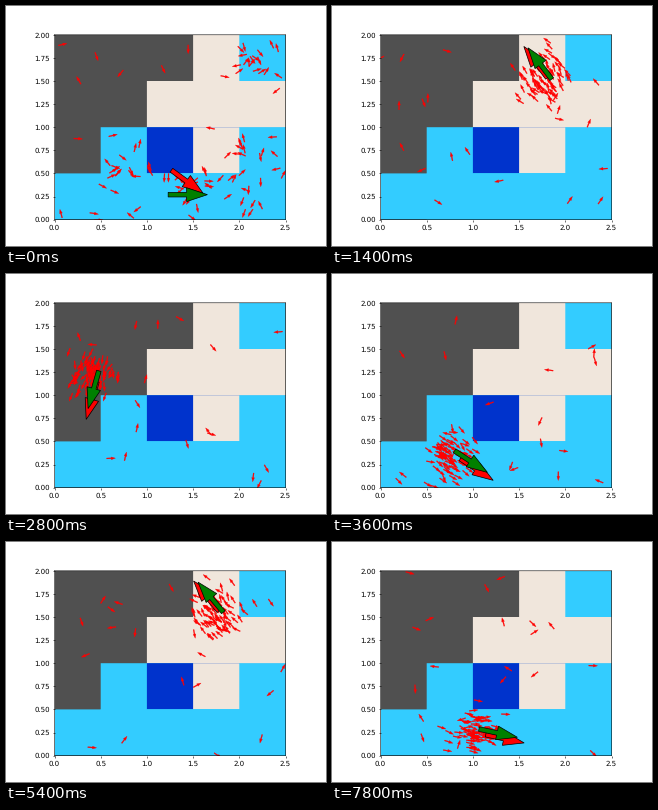
Recreate the animation shown at these times as a matplotlib script. Size 320 by 240 pixels, loop 8000 ms.

```python
import numpy as np
import matplotlib.pyplot as plt
from matplotlib.animation import FuncAnimation
from matplotlib.collections import PolyCollection
from matplotlib.patches import Polygon, Rectangle

FRAMES, INTERVAL = 40, 200
WIDTH, HEIGHT, CELL = 2.5, 2.0, 0.5
TRACKED, STRAYS = 80, 20
SMALL = dict(length=0.05, width=0.01)
BIG = dict(length=0.2, width=0.05)

COLORS = dict(g="#505050", b="#f0e6dc", s="#33ccff", d="#0033cc")
MAP = ["gggbs",
       "ggbbb",
       "gsdbs",
       "sssss"]

CENTER, RADIUS = np.array([1.23, 1.05]), 0.78
TURN = np.radians(18.15)
STEP = 2 * RADIUS * np.sin(TURN / 2)

rng = np.random.default_rng(7)


def unit(h):
    return np.stack([np.cos(h), np.sin(h)], -1)


def arrow(x, y, h, length, width):
    """Corners of an arrow with its tail at (x, y)."""
    w, head = width / 2, 1.5 * width
    pts = np.array([(0, -w), (length, -w), (length, -head),
                    (length + 3 * head, 0),
                    (length, head), (length, w), (0, w)])
    along = unit(h)
    across = unit(h + np.pi / 2)
    return pts @ np.array([along, across]) + (x, y)


def robot_pose(k):
    """The robot drives round a circle at a steady rate."""
    h = TURN * k
    return CENTER + RADIUS * unit(h - np.pi / 2), h


def guess_pose(k):
    """The estimate runs a little ahead, after a poor first guess."""
    xy, h = robot_pose(k)
    lost = max(0, 1 - k / 4)
    ahead = 0.075 * unit(h) + (0, -0.045)
    return xy + ahead + lost * np.array([-0.04, 0.31]), h - 0.63 * lost


def uniform(n):
    xy = rng.uniform(0, (WIDTH, HEIGHT), (n, 2))
    return xy, rng.uniform(0, 2 * np.pi, n)


def on_water(xy):
    cols, rows = (xy // CELL).astype(int).T
    return np.array([MAP[3 - r][c] == "s" for c, r in zip(cols, rows)])


def first_particles():
    """Random poses on light blue cells, some of them near-copies."""
    xy, h = uniform(400)
    pool = np.flatnonzero(on_water(xy))[:50]
    pick = rng.choice(pool, TRACKED)
    return (xy[pick] + rng.normal(0, 0.04, (TRACKED, 2)),
            h[pick] + rng.normal(0, 0.2, TRACKED))


def simulate():
    """Each particle wanders until it joins the swarm at the robot."""
    xy, h = first_particles()
    joins = rng.geometric(0.4, TRACKED)
    spread = rng.normal(0, 1, (TRACKED, 3))
    for k in range(FRAMES):
        stray_xy, stray_h = uniform(STRAYS)
        yield np.vstack([xy, stray_xy]), np.concatenate([h, stray_h])

        pos, heading = robot_pose(k + 1)
        spread = 0.7 * spread + 0.71 * rng.normal(0, 1, spread.shape)
        joined = joins <= k + 1
        free_xy = (xy + STEP * unit(h + TURN / 2)) % (WIDTH, HEIGHT)
        swarm_xy = pos + (-0.06, -0.03) + 0.13 * spread[:, :2]
        xy = np.where(joined[:, None], swarm_xy, free_xy)
        h = np.where(joined, heading + 0.27 * spread[:, 2], h + TURN)


history = list(simulate())

# Stage
plt.rcParams.update({"font.family": "DejaVu Sans", "path.snap": False,
                     "text.hinting": "none"})
fig, ax = plt.subplots(figsize=(6.4, 4.8), dpi=50)
ax.set_aspect("equal")
ax.set_xlim(0, WIDTH)
ax.set_ylim(0, HEIGHT)
ax.set_xticks(np.arange(0, 2.6, 0.5))
ax.set_yticks(np.arange(0, 2.1, 0.25))

# Each cell reaches to the far corner and is overpainted, so no seams show
for r, row in enumerate(MAP):
    for c, kind in enumerate(row):
        left, top = c * CELL, HEIGHT - r * CELL
        ax.add_patch(Rectangle((left, 0), WIDTH - left, top,
                               fc=COLORS[kind], lw=0, zorder=0))

swarm = PolyCollection([], facecolor="red", edgecolor="red", linewidth=0.4,
                       zorder=1)
ax.add_collection(swarm, autolim=False)


def big_arrow(color, zorder):
    return ax.add_patch(Polygon(arrow(0, 0, 0, **BIG), closed=True, fc=color,
                                ec="black", lw=1, zorder=zorder))


guess_arrow = big_arrow("red", 1.1)
robot_arrow = big_arrow("green", 1.2)


def update(k):
    xy, h = history[k]
    swarm.set_verts([arrow(x, y, a, **SMALL) for (x, y), a in zip(xy, h)])
    for shape, (pos, heading) in ((guess_arrow, guess_pose(k)),
                                  (robot_arrow, robot_pose(k))):
        shape.set_xy(arrow(*pos, heading, **BIG))
    return swarm, guess_arrow, robot_arrow


anim = FuncAnimation(fig, update, frames=FRAMES, interval=INTERVAL,
                     repeat=True, repeat_delay=0)
plt.show()
```
